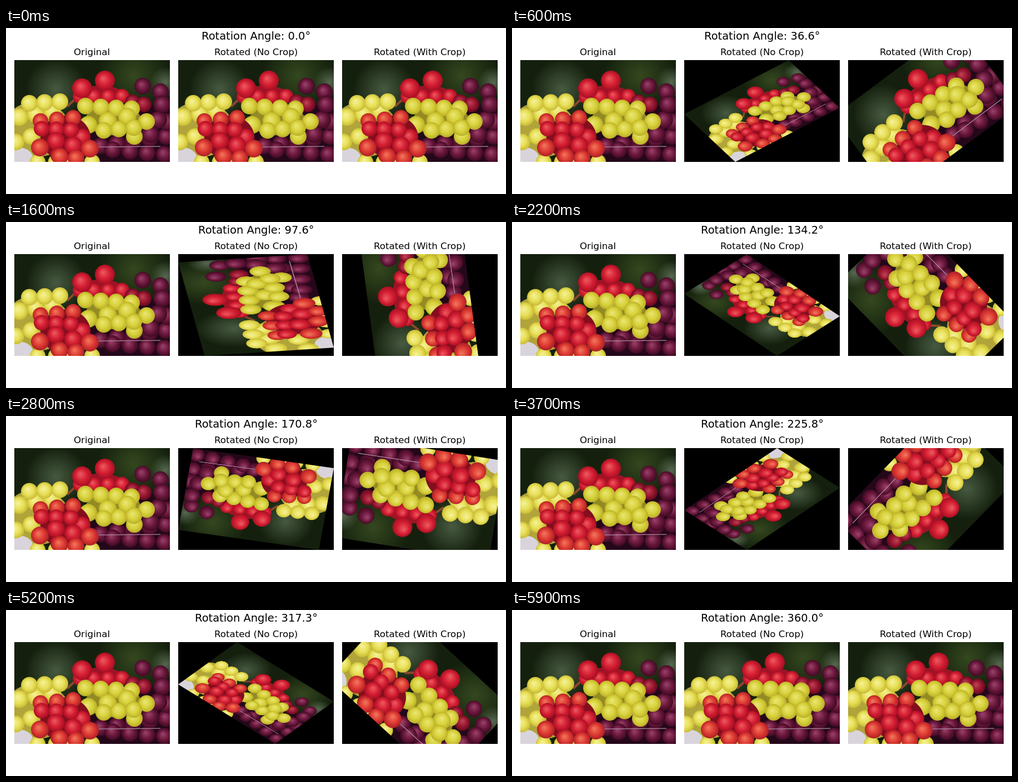
An HTML page with a canvas for the animation above (6000 ms loop, 900 by 300 pixels).

```html
<!DOCTYPE html>
<html lang="en">
<head>
<meta charset="utf-8">
<title>Rotation with and without cropping</title>
<style>
  html, body { margin: 0; width: 100%; height: 100%; overflow: hidden; background: #fff; }
  canvas { display: block; }
</style>
</head>
<body>
<canvas id="stage" width="900" height="300"></canvas>
<script>
const W = 280, H = 184, TOP = 58, SCALE = 2;
const STEPS = 60, STEP_MS = 100;
const ctx = document.getElementById('stage').getContext('2d');

// Grape skins: highlight, body, rim
const YELLOW = ['#ebe778', '#d8d23c', '#b4a824'];
const PALE = ['#f6f29c', '#e8e058', '#c2b42e'];
const RED = ['#ee5c62', '#d41e32', '#9c0c20'];
const ORANGE = ['#f27a60', '#de3a32', '#a41a24'];
const WINE = ['#c04456', '#981630', '#5a081c'];
const PURPLE = ['#9c446c', '#6a183c', '#38081e'];

function paintPhoto() {
  const photo = document.createElement('canvas');
  photo.width = W * SCALE;
  photo.height = H * SCALE;
  const p = photo.getContext('2d');
  p.scale(SCALE, SCALE);

  function glow(x, y, r, color) {
    const g = p.createRadialGradient(x, y, 0, x, y, r);
    g.addColorStop(0, color);
    g.addColorStop(1, color + '00');
    p.fillStyle = g;
    p.fillRect(0, 0, W, H);
  }

  function oval(color, x, y, rx, ry = rx) {
    p.fillStyle = color;
    p.beginPath();
    p.ellipse(x, y, rx, ry, 0, 0, 2 * Math.PI);
    p.fill();
  }

  // Evenly spaced grapes between two points
  function row([light, body, rim], x1, y1, x2, y2, count, r) {
    for (let i = 0; i < count; i++) {
      const k = i / (count - 1);
      const x = x1 + (x2 - x1) * k, y = y1 + (y2 - y1) * k;
      const g = p.createRadialGradient(x - r * .2, y - r * .25, 0, x, y, r * 1.1);
      g.addColorStop(0, light);
      g.addColorStop(.55, body);
      g.addColorStop(1, rim);
      oval(g, x, y, r);
    }
  }

  function line(color, width, x1, y1, x2, y2) {
    p.strokeStyle = color;
    p.lineWidth = width;
    p.beginPath();
    p.moveTo(x1, y1);
    p.lineTo(x2, y2);
    p.stroke();
  }

  // Blurred garden
  p.fillStyle = '#14200d';
  p.fillRect(0, 0, W, H);
  glow(75, 52, 55, '#475a41');
  glow(215, 28, 65, '#34481f');
  glow(272, 40, 28, '#56684f');

  // Purple bunch on the right
  oval('#24081a', 230, 150, 95, 70);
  row(PURPLE, 231, 47, 263, 57, 2, 15);
  row(PURPLE, 155, 155, 273, 138, 5, 15);
  row(PURPLE, 245, 134, 275, 112, 2, 16);
  row(PURPLE, 259, 108, 266, 80, 2, 16);
  row(PURPLE, 177, 162, 270, 170, 4, 15);
  line('#a88aa4', 1.2, 150, 157, 263, 156);
  line('#8a4a2c', 4, 95, 84, 112, 68);

  // Pale bunch on the left
  oval('#b0a43a', 40, 125, 60, 50);
  oval('#d9d4dc', 8, 178, 26, 20);
  row(PALE, 9, 103, 68, 92, 3, 16);
  row(PALE, 27, 78, 82, 75, 3, 15);
  row(PALE, 3, 148, 30, 138, 2, 15);
  row(PALE, 42, 184, 140, 184, 4, 14);

  // Red bunch at the back
  oval('#9c1426', 155, 66, 45, 20);
  row(RED, 118, 66, 194, 65, 4, 13);
  row(RED, 122, 51, 163, 37, 2, 18);
  row(WINE, 213, 76, 233, 80, 2, 14);

  // Yellow bunch in the middle
  oval('#948a24', 178, 108, 50, 28);
  row(YELLOW, 128, 83, 211, 88, 4, 15);
  row(YELLOW, 216, 138, 238, 111, 2, 15);
  row(YELLOW, 133, 117, 203, 102, 3, 16);
  row(YELLOW, 161, 127, 215, 122, 3, 15);

  // Red bunch in front
  oval('#840e1e', 92, 140, 45, 40);
  row(ORANGE, 47, 110, 106, 104, 3, 14);
  row(RED, 80, 172, 122, 139, 2, 15);
  row(RED, 49, 124, 102, 126, 3, 14);
  row(RED, 75, 146, 106, 154, 2, 16);
  row(ORANGE, 46, 158, 136, 160, 2, 16);
  row(ORANGE, 82, 174, 111, 177, 2, 15);
  return photo;
}

const photo = paintPhoto();

function label(text, center, baseline, size) {
  ctx.fillStyle = '#000';
  ctx.font = `${size}px "DejaVu Sans", sans-serif`;
  ctx.fillText(text, Math.round(center - ctx.measureText(text).width / 2), baseline);
}

function panel(left, title, angle, fit) {
  label(title, left + W / 2, 49, 16.667);
  ctx.save();
  ctx.beginPath();
  ctx.rect(left, TOP, W, H);
  ctx.clip();
  ctx.fillStyle = '#000';
  ctx.fillRect(left, TOP, W, H);
  ctx.translate(left + W / 2, TOP + H / 2);
  if (fit) {
    // Squeeze the rotated bounding box into the panel
    const c = Math.abs(Math.cos(angle)), s = Math.abs(Math.sin(angle));
    ctx.scale(W / (W * c + H * s), H / (W * s + H * c));
  }
  ctx.rotate(-angle);
  ctx.drawImage(photo, -W / 2, -H / 2, W, H);
  ctx.restore();
}

function draw() {
  const step = Math.floor(performance.now() / STEP_MS) % STEPS;
  const degrees = step * 360 / (STEPS - 1);
  const angle = degrees * Math.PI / 180;
  ctx.fillStyle = '#fff';
  ctx.fillRect(0, 0, 900, 300);
  label(`Rotation Angle: ${degrees.toFixed(1)}°`, 450, 21, 19.444);
  panel(15, 'Original', 0, false);
  panel(310, 'Rotated (No Crop)', angle, true);
  panel(605, 'Rotated (With Crop)', angle, false);
  requestAnimationFrame(draw);
}
draw();
</script>
</body>
</html>
```
